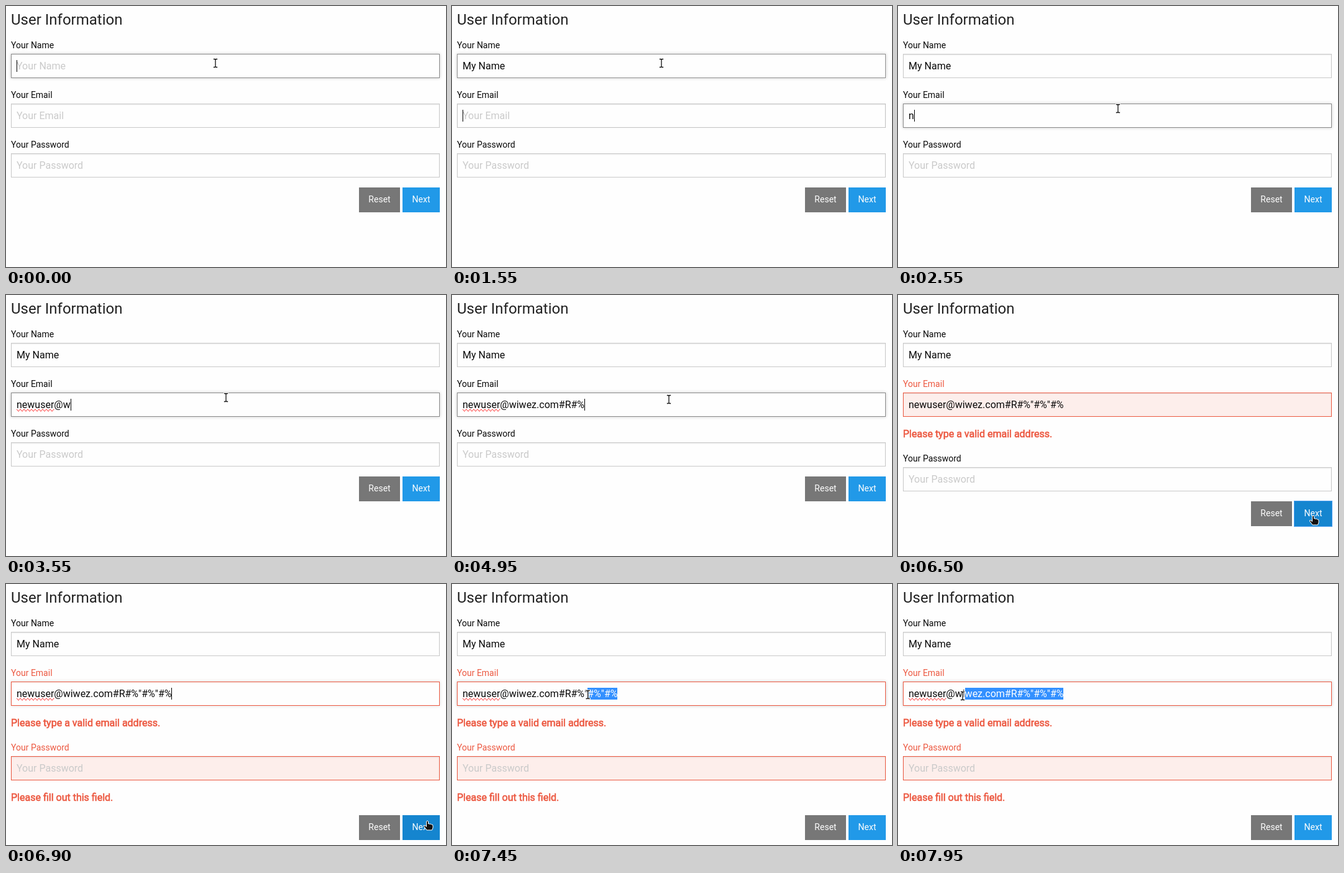
Write an HTML page that moves like this. It is 708 by 420 pixels and loops after 8000 ms.

```html
<!DOCTYPE html>
<html lang="en">
<head>
<meta charset="utf-8">
<title>User Information</title>
<style>
html, body { margin: 0; width: 100%; height: 100%; overflow: hidden; background: #fefefe; }
body { position: relative; font: 16px/19px Roboto, sans-serif; color: #0a0a0a; }
body > * { position: absolute; box-sizing: border-box; margin: 0; white-space: pre; }
h1 { left: 8px; top: 7px; font: 400 24px/30px Roboto, sans-serif; font-stretch: 80%; color: #222; }
.label { left: 8px; font-size: 14px; line-height: 25px; }
.field { left: 8px; width: 690px; height: 39px; padding: 9px 8px; border: 1px solid; }
.error { left: 8px; color: #ec5840; -webkit-text-stroke: .6px #ec5840; }
.button { height: 40px; font-size: 14px; line-height: 39px; color: #fefefe; text-align: center; }
.caret { width: 1px; height: 19px; background: #000; }
.hint { color: #cacaca; }
.typo { text-decoration: spelling-error; }
.picked { background: #3390ff; color: #fff; }
svg { left: 0; top: 0; width: 708px; height: 420px; }
</style>
</head>
<body>
<h1>User Information</h1>
<svg>
  <g id="beam" fill="none" stroke-linecap="square">
    <path id="bar" d="M-2.5-6.5H-1L0-5.5 1-6.5H2.5M0-5V5M-2.5 6.5H-1L0 5.5 1 6.5H2.5" stroke="#fff" stroke-width="3"/>
    <use href="#bar"/>
    <path d="M-2.5-6.5H-1L0-5.5 1-6.5H2.5M0-5V5M-2.5 6.5H-1L0 5.5 1 6.5H2.5" stroke="#111" stroke-width="1.3"/>
  </g>
  <path id="arrow" d="M0 0V16L4 12.5 6.5 18 9 17 6.5 11.5H11.5Z" fill="#111" stroke="#fff"/>
  <path id="hand" d="M-1.5 1Q0-1 1.5 1V5Q3 4 4 5.5 5.5 4.5 6.5 6 9 5.5 9 8V11L7.5 15H-1L-5.5 9Q-6 7-4 7.5L-1.5 9.5Z" fill="#111" stroke="#fff"/>
</svg>
<script>
const LOOP = 8000, EMAIL_ERROR = 6300, ALL_ERRORS = 6600;
const NAME = "My Name", USER = "newuser", EMAIL = USER + '@wiwez.com#R#%"#%"#%';
const svg = document.querySelector("svg");
const pens = ["beam", "arrow", "hand"].map(id => document.getElementById(id));
const ruler = document.createElement("canvas").getContext("2d");
ruler.font = "16px Roboto, sans-serif";

const GREY = [202, 202, 202], DARK = [138, 138, 138], RED = [236, 88, 64];
// bursts of keys: first key time, last key time, number of keys
const nameKeys = [[450, 950, 7]];
const emailKeys = [[2550, 3100, 8], [3550, 3850, 5], [4150, 4350, 4], [4650, 4800, 3], [4950, 5000, 2], [5200, 5600, 5]];
const caretOff = [[250, 450], [1250, 1550], [2250, 2550], [3250, 3550], [5850, ALL_ERRORS]];
// pointer path: time, x, y
const path = [
  [0, 337, 92], [1550, 337, 92], [1900, 354, 165], [4650, 354, 165], [4800, 349, 168], [5200, 349, 168],
  [5700, 348, 249], [5850, 344, 300], [5950, 340, 335], [6250, 660, 312], [EMAIL_ERROR, 664, 314],
  [6500, 668, 355], [6550, 668, 355], [6650, 672, 380], [6900, 678, 381], [7300, 290, 178],
  [7350, 268, 178], [7500, 194, 178], [7950, 104, 180], [LOOP, 104, 180]
];

function add(kind, text = "") {
  const el = document.createElement("div");
  el.className = kind;
  el.textContent = text;
  document.body.insertBefore(el, svg);
  return el;
}
const rows = ["Your Name", "Your Email", "Your Password"].map(text =>
  ({ text, label: add("label", text), field: add("field") }));
const errors = ["Please type a valid email address.", "Please fill out this field."].map(s => add("error", s));
const reset = add("button", "Reset"), next = add("button", "Next"), caret = add("caret");
Object.assign(reset.style, { left: "568px", width: "66px", background: "#777" });
Object.assign(next.style, { left: "638px", width: "60px" });

const clamp = x => Math.max(0, Math.min(1, x));
const ease = x => x * x * (3 - 2 * x);
const ramp = (t, start, span) => ease(clamp((t - start) / span));
const mix = (a, b, k) => `rgb(${a.map((v, i) => v + (b[i] - v) * k)})`;
const width = s => ruler.measureText(s).width;
const within = (t, [a, b]) => t >= a && t < b;
const span = (kind, s) => `<span class="${kind}">${s}</span>`;

function keyCount(t, bursts) {
  return bursts.reduce((n, [a, b, count]) =>
    n + (t < a ? 0 : Math.min(count, 1 + Math.floor((t - a) / (b - a) * (count - 1) + 1e-6))), 0);
}

function pointer(t) {
  const i = path.findIndex(p => p[0] > t), [t0, x0, y0] = path[i - 1], [t1, x1, y1] = path[i];
  const k = (t - t0) / (t1 - t0);
  return [x0 + (x1 - x0) * k, y0 + (y1 - y0) * k];
}

// index of the first selected letter while the pointer drags leftwards
function dragStart(t, x) {
  let n = EMAIL.length;
  if (t >= 7350) while (n && (width(EMAIL.slice(0, n)) + width(EMAIL.slice(0, n - 1))) / 2 + 17 > x + 4) n--;
  return n;
}

function draw(t) {
  const bad = [false, t >= EMAIL_ERROR, t >= ALL_ERRORS];
  const tops = [77, 157, bad[1] ? 277 : 237];
  const buttonTop = 292 + 40 * bad[1] + 40 * bad[2];
  const [mx, my] = pointer(t);
  const name = NAME.slice(0, keyCount(t, nameKeys));
  const email = EMAIL.slice(0, keyCount(t, emailKeys));
  const focused = t < 1550 ? 0 : t < EMAIL_ERROR || bad[2] ? 1 : -1;
  const glow = (time) => [
    1 - ramp(t, 1500, time),
    bad[2] ? ramp(t, ALL_ERRORS, time) : ramp(t, 1500, time) * !bad[1],
    0
  ];
  const edge = glow(250), halo = glow(500);

  const cut = dragStart(t, mx);
  const typo = t >= 3250 && focused === 1;
  const content = [
    name,
    typo ? span("typo", USER) + email.slice(USER.length, cut) + span("picked", email.slice(cut)) : email,
    ""
  ];
  rows.forEach(({ text, label, field }, i) => {
    const alert = bad[i];
    label.style.top = tops[i] - 26 + "px";
    label.style.color = alert ? mix(RED, RED, 0) : "";
    field.innerHTML = content[i] || span("hint", text);
    Object.assign(field.style, {
      top: tops[i] + "px",
      borderColor: alert ? mix(RED, RED, 0) : mix(GREY, DARK, edge[i]),
      background: alert && focused !== i ? "#fdeeeb" : "#fefefe",
      boxShadow: `inset 0 1px 2px rgba(10,10,10,${.1 * (1 - halo[i])}), 0 0 5px rgba(202,202,202,${halo[i]})`
    });
  });
  errors.forEach((el, i) => {
    el.style.top = [214, 334][i] + "px";
    el.hidden = !bad[i + 1];
  });

  const overNext = mx > 638 && mx < 698 && my > buttonTop && my < buttonTop + 40;
  reset.style.top = next.style.top = buttonTop + "px";
  next.style.background = overNext ? "#1585cf" : "#2199e8";
  next.style.outline = bad[1] && !bad[2] ? "1px solid #4a9df0" : "none";

  const typed = focused ? email : name;
  caret.hidden = focused < 0 || cut < EMAIL.length || caretOff.some(r => within(t, r));
  caret.style.left = 17 + Math.round(width(typed)) + "px";
  caret.style.top = (focused ? 167 : 87) + "px";

  const overField = mx < 698 && tops.some(y => my >= y && my < y + 39);
  const shape = overNext ? 2 : overField ? 0 : 1;
  pens.forEach((pen, i) => {
    pen.style.display = i === shape ? "" : "none";
    pen.setAttribute("transform", `translate(${mx} ${my})`);
  });
}

function tick() {
  draw(Math.floor(performance.now() % LOOP / 50) * 50);
  requestAnimationFrame(tick);
}
tick();
</script>
</body>
</html>
```
